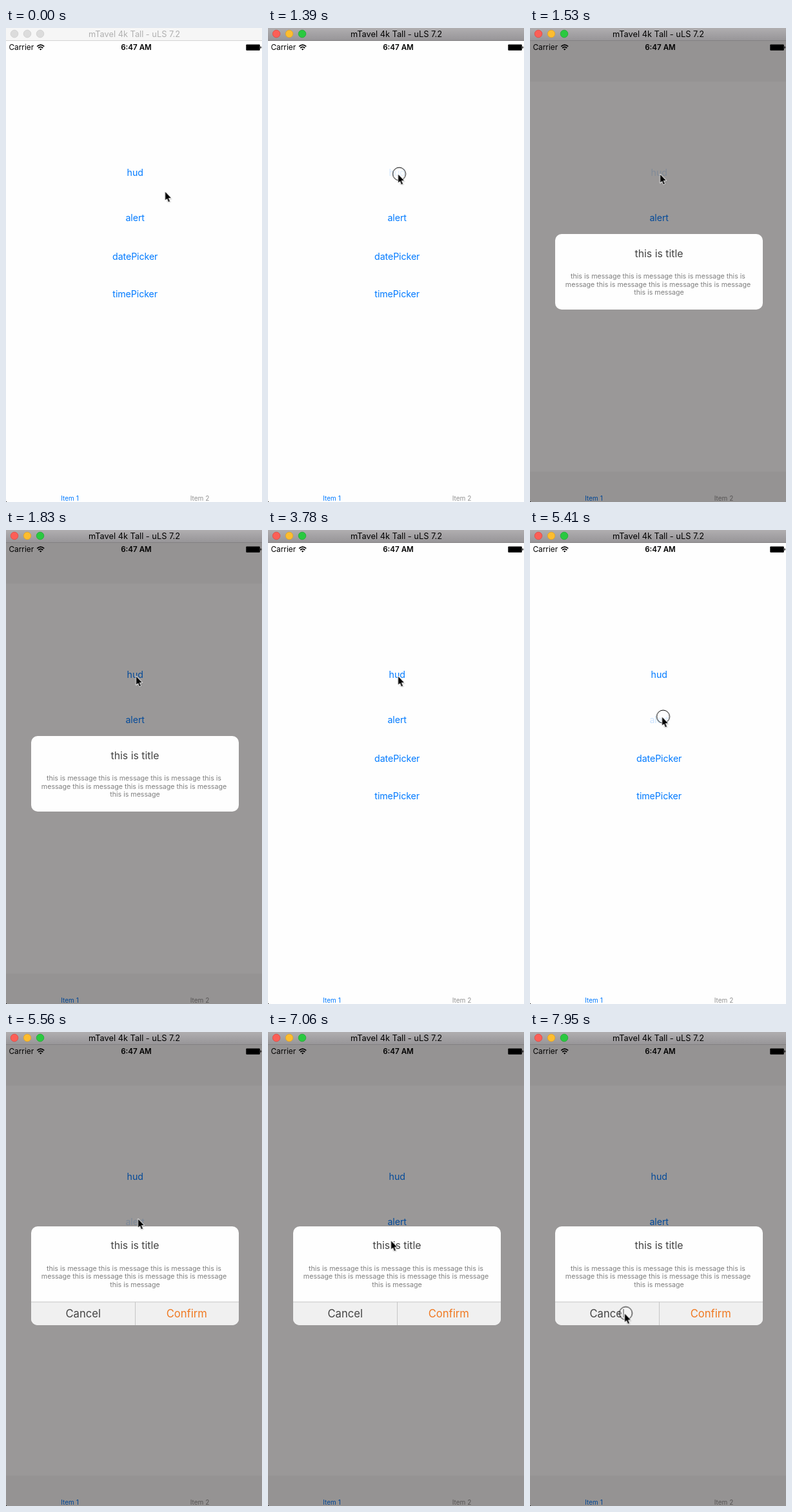
These frames come from a looping animation (397 px wide and 734 px high, 8 s). An HTML page:

```html
<!DOCTYPE html>
<html lang="en">
<head>
<meta charset="utf-8">
<title>Dialog demo</title>
<style>
html, body { margin: 0; width: 100%; height: 100%; overflow: hidden; background: #fefefe; }
svg { display: block; width: 397px; height: 734px; font-family: Inter, "Open Sans", sans-serif; }
.mid { text-anchor: middle; }
.link { font-size: 14.2px; letter-spacing: -.08px; fill: #007aff; text-anchor: middle; }
.tab { font-size: 10px; text-anchor: middle; }
.title { font-size: 15.8px; fill: #444; text-anchor: middle; }
.msg { font-size: 10.65px; fill: #7e7e7e; text-anchor: middle; }
.btn { font-size: 16.6px; text-anchor: middle; }
.head { font-size: 12.8px; text-anchor: middle; }

.step { animation: 8s step-end infinite; }
.idle { animation-name: idle; }
.active { animation-name: active; }
.hud { animation-name: hud; }
.alert { animation-name: alert; }
.dim { animation-name: dim; }
.toast { animation-name: toast; }
.confirm { animation-name: confirm; }
.ring { animation-name: ring; }
.pointer { animation: move 8s step-end infinite; }

@keyframes idle { 0% { opacity: 1 } 17.375%, 100% { opacity: 0 } }
@keyframes active { 0% { opacity: 0 } 17.375%, 100% { opacity: 1 } }
@keyframes hud {
  0% { opacity: 1 } 17.375% { opacity: .17 } 21% { opacity: .6 } 22.875%, 100% { opacity: 1 }
}
@keyframes alert {
  0% { opacity: 1 } 67.625% { opacity: .2 } 71.375% { opacity: .6 } 73.25%, 100% { opacity: 1 }
}
@keyframes dim {
  0% { opacity: 0 } 19.125% { opacity: 1 } 47.25% { opacity: 0 } 69.5%, 100% { opacity: 1 }
}
@keyframes toast { 0% { opacity: 0 } 19.125% { opacity: 1 } 47.25%, 100% { opacity: 0 } }
@keyframes confirm { 0% { opacity: 0 } 69.5%, 100% { opacity: 1 } }
@keyframes ring {
  0% { opacity: 0 } 17.375% { opacity: 1 } 19.125% { opacity: 0 }
  67.625% { opacity: 1 } 69.5% { opacity: 0 } 99.375%, 100% { opacity: 1 }
}
@keyframes move {
  0% { transform: translate(246.5px, 253px) }
  6.25% { transform: translate(246.5px, 253px); animation-timing-function: steps(4, start) }
  13.58% { transform: translate(201.5px, 226px) }
  54.75% { transform: translate(201.5px, 226px); animation-timing-function: steps(4, start) }
  62.1% { transform: translate(208.5px, 257px); animation-timing-function: steps(4, start) }
  69.45% { transform: translate(204.5px, 289px) }
  88.25% { transform: translate(204.5px, 289px); animation-timing-function: steps(4, start) }
  95.75% { transform: translate(148.5px, 424px) }
  97.625%, 100% { transform: translate(146.5px, 435.5px) }
}
</style>
</head>
<body>
<svg viewBox="0 0 397 734">
  <defs>
    <linearGradient id="bar" x2="0" y2="1">
      <stop stop-color="#b0aeb0"/><stop offset="1" stop-color="#969497"/>
    </linearGradient>
    <g id="copy">
      <text class="title" x="200" y="36">this is title</text>
      <text class="msg" y="69.5">
        <tspan x="200">this is message this is message this is message this is</tspan>
        <tspan x="200" dy="12.7">message this is message this is message this is message</tspan>
        <tspan x="200" dy="12.7">this is message</tspan>
      </text>
    </g>
  </defs>

  <rect width="397" height="734" fill="#fefefe"/>

  <!-- Screen -->
  <text class="link step hud" x="200.2" y="229.3">hud</text>
  <text class="link step alert" x="200.2" y="299.3">alert</text>
  <text class="link" x="200.2" y="358.5">datePicker</text>
  <text class="link" x="200.2" y="417">timePicker</text>
  <text class="tab" x="99" y="732.3" fill="#007aff">Item 1</text>
  <text class="tab" x="300.5" y="732.3" fill="#929292">Item 2</text>
  <rect y="733" width="1" height="1"/>

  <g class="step dim">
    <rect y="20" width="397" height="714" fill="#060101" opacity=".4"/>
    <path d="M0 20H397V83H0ZM0 687H397V734H0Z" opacity=".035"/>
  </g>

  <!-- Status bar -->
  <text x="4.5" y="34.4" font-size="11.8">Carrier</text>
  <g fill="none" stroke="#000" stroke-width="1.7">
    <path d="M48.2 28.6Q53.7 23.6 59.2 28.6"/>
    <path d="M50.1 31Q53.7 27.8 57.3 31"/>
    <path d="M53.7 34.6L51.9 32.7Q53.7 31.3 55.5 32.7Z" fill="#000" stroke="none"/>
  </g>
  <text class="mid" x="202" y="34.4" font-size="11.6" font-weight="600">6:47 AM</text>
  <rect x="372.3" y="25.5" width="21.5" height="9.2" rx="1"/>
  <path d="M394.5 28.3Q396 28.6 396 30.1T394.5 31.9Z"/>

  <!-- Window bar -->
  <g class="step idle">
    <rect width="397" height="20" fill="#f6f6f6"/>
    <rect y="19" width="397" height="1" fill="#d4d4d4"/>
    <g fill="#dcdcdc" stroke="#cfcfcf" stroke-width=".8">
      <circle cx="13" cy="9" r="5.8"/><circle cx="33" cy="9" r="5.8"/><circle cx="53" cy="9" r="5.8"/>
    </g>
    <text class="head" x="199" y="14" fill="#b0b0b0">mTavel 4k Tall - uLS 7.2</text>
  </g>
  <g class="step active">
    <rect width="397" height="20" fill="url(#bar)"/>
    <rect y="19" width="397" height="1" fill="#828082"/>
    <g stroke-width=".8">
      <circle cx="13" cy="9" r="5.8" fill="#fc5f57" stroke="#df4a43"/>
      <circle cx="33" cy="9" r="5.8" fill="#fdbd2f" stroke="#dea128"/>
      <circle cx="53" cy="9" r="5.8" fill="#2ac940" stroke="#20aa33"/>
    </g>
    <text class="head" x="199" y="14">mTavel 4k Tall - uLS 7.2</text>
  </g>

  <!-- Dialogs -->
  <g class="step toast">
    <rect x="39" y="319" width="322" height="117" rx="10" fill="#fefefe"/>
    <use href="#copy" y="318.5"/>
  </g>
  <g class="step confirm">
    <rect x="39" y="301" width="322" height="153" rx="10" fill="#fefefe"/>
    <path d="M39 418H361V444A10 10 0 0 1 351 454H49A10 10 0 0 1 39 444Z" fill="#f0f0f0"/>
    <path d="M39 418H361M200.5 418V454" stroke="#c6c6c6"/>
    <use href="#copy" y="300.3"/>
    <text class="btn" x="119.7" y="442" fill="#444">Cancel</text>
    <text class="btn" x="280.3" y="442" fill="#f07820">Confirm</text>
  </g>

  <g class="pointer">
    <circle class="step ring" cx="2" cy="0" r="10" fill="#fff" fill-opacity=".3" stroke="#000"/>
    <path d="M1 3L3 16.5 6.5 18 9.5 16.5 8 13 11.5 12Z" opacity=".14"/>
    <path d="M.5 .8V13.6L3.4 11 5.6 16.2 7.5 15.4 5.3 10.3H9.4Z"
      stroke="#fff" stroke-width="1.8" stroke-linejoin="round" paint-order="stroke"/>
  </g>
</svg>
</body>
</html>
```
